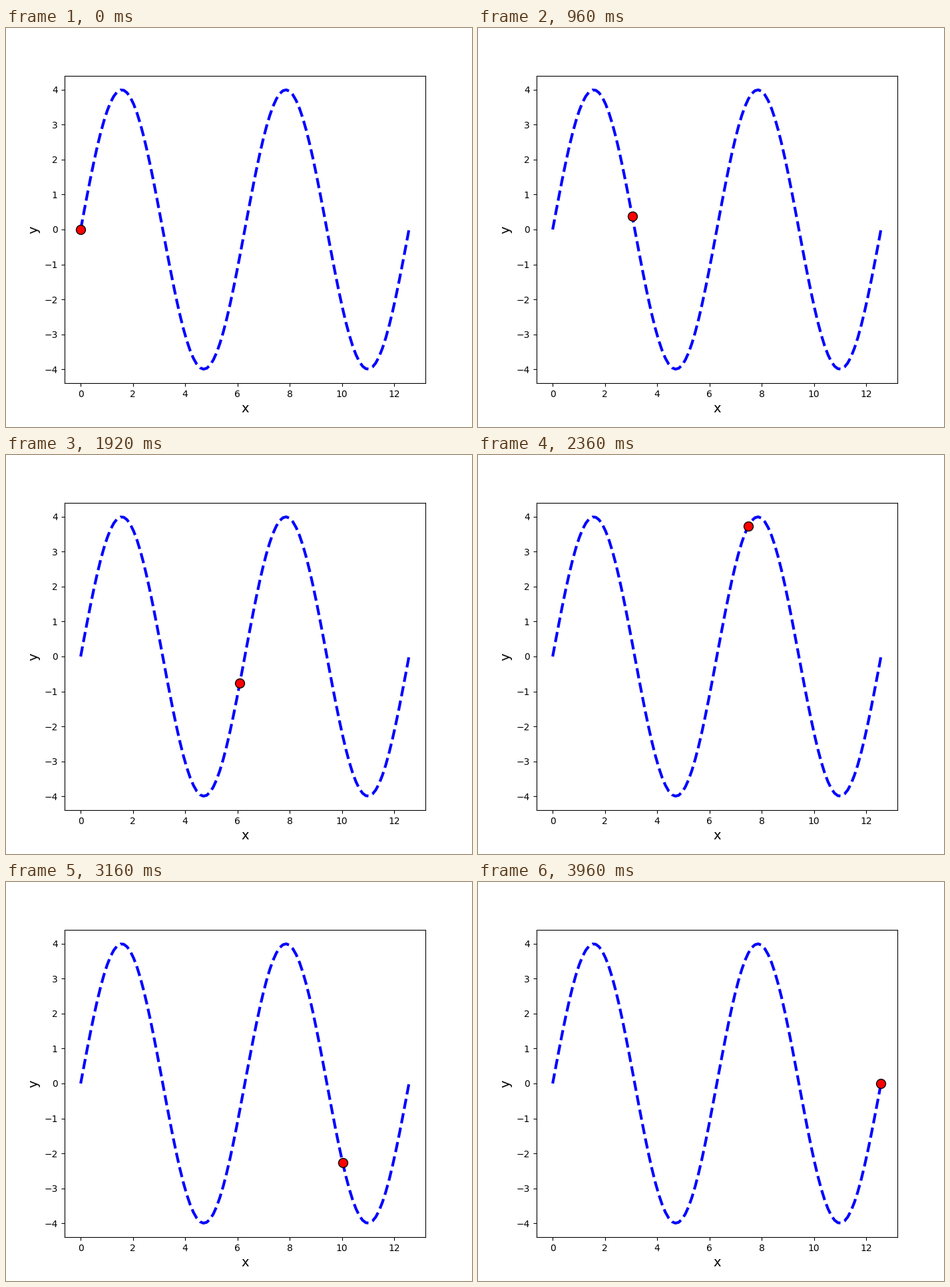
Recreate the animation shown at these times as a matplotlib script. Size 700 by 600 pixels, loop 4 s.

```python
import numpy as np
import matplotlib.pyplot as plt
from matplotlib.animation import FuncAnimation

STEPS = 100
INTERVAL = 40  # ms

x = np.linspace(0, 4 * np.pi, STEPS)
y = 4 * np.sin(x)

fig, ax = plt.subplots(figsize=(7, 6), dpi=100)
ax.plot(x, y, "b--", linewidth=3)
ball, = ax.plot(x[:1], y[:1], "o", markersize=10,
                markerfacecolor="red", markeredgecolor="black")
ax.set_xlabel("x", fontsize=14)
ax.set_ylabel("y", fontsize=14)


def update(i):
    ball.set_data([x[i]], [y[i]])
    return ball,


anim = FuncAnimation(fig, update, frames=STEPS, interval=INTERVAL,
                     repeat=True, repeat_delay=0)
plt.show()
```
